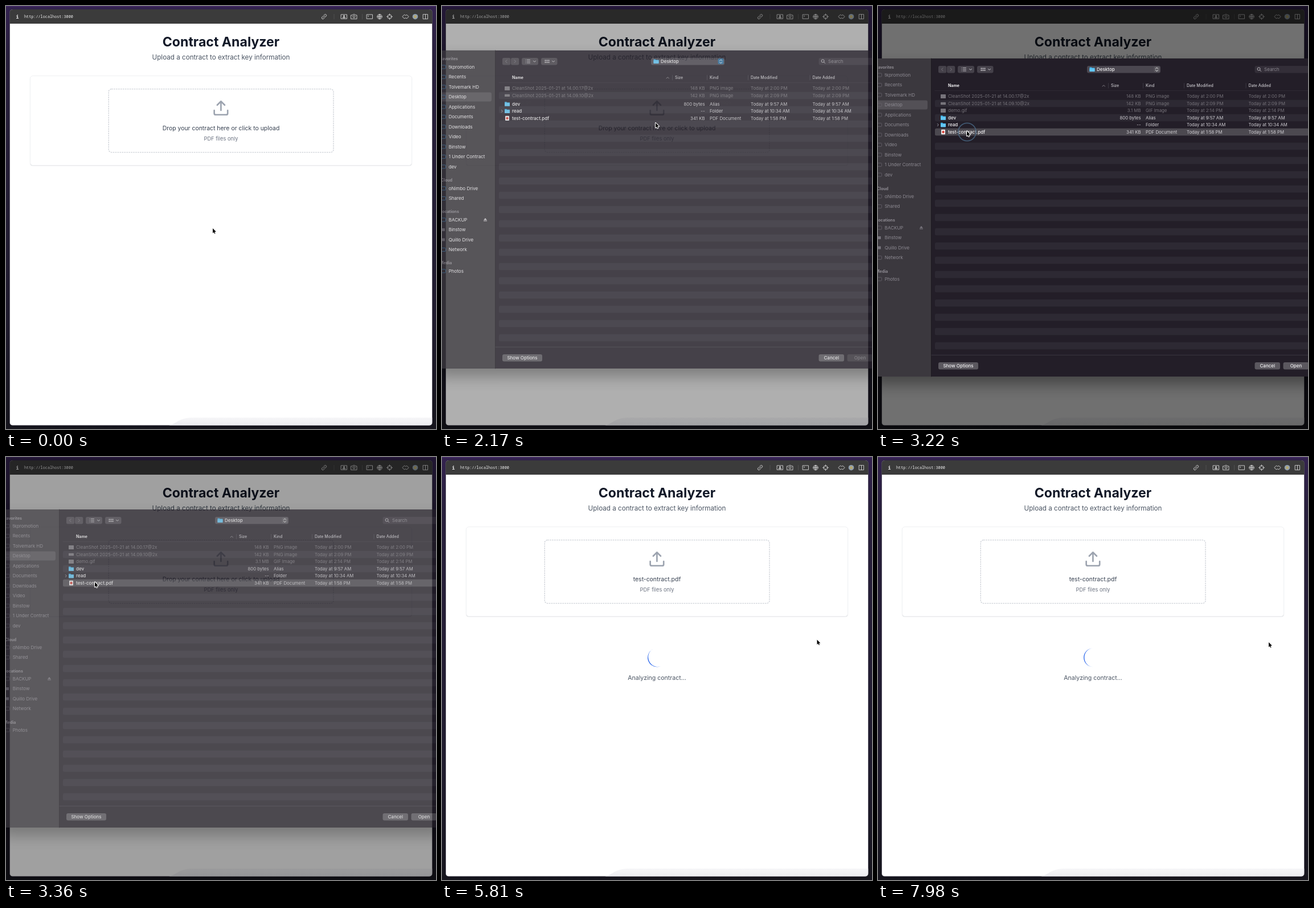
These frames come from a looping animation (755 by 742 pixels, 8000 ms). An HTML page:

```html
<!DOCTYPE html>
<html lang="en">
<head>
<meta charset="utf-8">
<title>Contract Analyzer</title>
<style>
html, body { margin: 0; width: 100%; height: 100%; overflow: hidden; background: #211a31; }
svg { display: block; position: fixed; inset: 0; width: 100%; height: 100%; }
text { font-family: Inter, "Open Sans", sans-serif; white-space: pre; }
.mono { font-family: "Noto Sans Mono", "DejaVu Sans Mono", monospace; }
.line { fill: none; stroke-linecap: round; stroke-linejoin: round; }
#dialog { filter: drop-shadow(0 14px 13px rgba(0, 0, 0, .38)); }
</style>
</head>
<body>
<svg id="stage" viewBox="0 0 755 742" preserveAspectRatio="none"></svg>
<script>
const LOOP = 8000, STEP = 70;
const stage = document.getElementById('stage');

// Markup helpers; text is placed by its vertical centre.
const text = (x, y, size, fill, str, more = '') =>
  `<text x="${x}" y="${y + size * 0.36}" font-size="${size}" fill="${fill}" ${more}>${str}</text>`;
const rect = (x, y, w, h, r, fill, more = '') =>
  `<rect x="${x}" y="${y}" width="${w}" height="${h}" rx="${r}" fill="${fill}" ${more}/>`;
const line = (d, stroke, w = 1, more = '') =>
  `<path class="line" d="${d}" stroke="${stroke}" stroke-width="${w}" ${more}/>`;
const circle = (x, y, r, fill, more = '') =>
  `<circle cx="${x}" cy="${y}" r="${r}" fill="${fill}" ${more}/>`;
const at = (x, y, body) => `<g transform="translate(${x} ${y})">${body}</g>`;
const MID = 'text-anchor="middle"', END = 'text-anchor="end"';
const BOLD = 'font-weight="700"', MEDIUM = 'font-weight="500"';

function toolbar() {
  const c = '#d4d4d4', k = (d) => line(d, c, 0.9);
  const ring = (r) => circle(0, 0, r, 'none', `stroke="${c}" stroke-width=".9"`);
  const frame = 'M-5 -3.7H5V3.7H-5Z';
  const icons = [
    [558.5, `<g transform="rotate(-45)">${k('M-.8 -2H-3a2 2 0 0 0 0 4H-.8M.8 -2H3a2 2 0 0 1 0 4H.8M-2 0H2')}</g>`],
    [593.5, k(frame) + circle(0, -1, 1.4, c) + rect(-2.6, 0.8, 5.2, 1.8, 0.8, c)],
    [611, k('M-5 -2.7H-2.6L-1.6 -4H1.6L2.6 -2.7H5V4H-5Z') + ring(1.9)],
    [638.5, k(frame) + k('M-3 -1.8L-1.8 -.8L-3 .2')],
    [656, ring(4.2) + k('M-4.2 0H4.2M0 -4.2V4.2M0 -4.2Q-4 0 0 4.2Q4 0 0 -4.2')],
    [673.5, ring(3.6) + k('M-5 0H-2M5 0H2M0 -5V-2M0 5V2')],
    [701.5, k('M-1.5 -3.2L0 -2L1.5 -3.2L3.2 -2.6L5.5 0L3.2 2.6L1.5 3.2L0 2L-1.5 3.2L-3.2 2.6L-5.5 0L-3.2 -2.6Z')],
    [718.5, circle(0, 0, 4.8, '#8f9fb0') + circle(0, 0, 2.6, '#b5a873')],
    [736.5, k('M-4 -4H4V4H-4ZM0 -4V4')]
  ];
  return `<path d="M6.5 31V12Q6.5 6 12 6H743Q748.5 6 748.5 12V31Z" fill="#3b3b3b"/>` +
    text(20, 19, 8.5, '#f2f2f2', 'i', `class="mono" ${BOLD} ${MID}`) +
    text(32, 19, 6.82, '#ececec', 'http://localhost:3000', 'class="mono"') +
    line('M576 14.5V23M625.5 14.5V23', '#575757', 0.8) +
    icons.map(([x, body]) => at(x, 18.7, body)).join('');
}

function page() {
  return rect(0, 0, 755, 742, 0, 'url(#desk)') +
    rect(0, 0, 755, 1.2, 0, '#45296b') +
    rect(6.5, 6, 742, 729.8, 5, '#fff', 'stroke="#2d2938" stroke-width=".6"') +
    `<path d="M286 735.6C300 733 303 722 328 722H748.2V730Q748.2 735.6 742 735.6Z" fill="url(#foot)"/>` +
    toolbar() +
    text(377.5, 62.5, 23.1, '#111827', 'Contract Analyzer', `${BOLD} ${MID}`) +
    text(377.5, 90.3, 11.65, '#4b5563', 'Upload a contract to extract key information', MID) +
    rect(42, 123.2, 671, 157.4, 5, '#e3e4e7') +
    rect(42.3, 122.5, 670.4, 157, 5, '#fff', 'stroke="#ebecef" stroke-width=".8"') +
    rect(180.2, 145.7, 394.8, 111, 5, 'none', 'id="drop" stroke-width="1.31" stroke-dasharray="2.6 1.35"') +
    `<g transform="translate(361.7 163.3) scale(1.31)">` +
    line('M21 15v4a2 2 0 0 1-2 2H5a2 2 0 0 1-2-2v-4M17 8l-5-5-5 5M12 3v12', '#9ca3af', 2) + '</g>' +
    text(377.5, 214.6, 10.45, '#374151', '', `id="label" ${MID}`) +
    text(377.5, 233, 9.25, '#6b7280', 'PDF files only', MID) +
    `<g id="busy"><path id="spinner" d="M-16.4 0A16.4 16.4 0 0 0 16.4 0A16.4 15.1 0 0 1 -16.4 0Z" fill="#2563eb"/>` +
    text(377.5, 387.3, 10.55, '#4b5563', 'Analyzing contract...', MID) + '</g>';
}

function sidebar() {
  const groups = [
    [107, -3.7, 'Favorites', ['tkpromotion', 'Recents', 'Tolvemark HD', 'Desktop', 'Applications',
      'Documents', 'Downloads', 'Video', 'Binstow', '1 Under Contract', 'dev']],
    [320, -1.9, 'Cloud', ['oNimbo Drive', 'Shared']],
    [375, -3.7, 'Locations', ['BACKUP', 'Binstow', 'Quillo Drive', 'Network']],
    [465, -3.7, 'Media', ['Photos']]
  ];
  let out = rect(-10, 92, 103.5, 558, 0, '#3b383e') + rect(-6, 165.5, 93, 16, 3, '#535056');
  for (const [top, x, title, items] of groups) {
    out += text(x, top, 7, '#8f8c93', title, BOLD);
    items.forEach((name, i) => {
      const y = top + 14 + i * 17.5;
      const plain = title === 'Locations' && (i === 1 || i === 2);
      out += plain ? rect(0, y - 2.5, 5, 5, 0, '#77747c')
        : rect(-1.5, y - 3, 8, 6, 1.2, 'none', 'stroke="currentColor" stroke-width=".8"');
      out += text(11.7, y, 8, 'var(--ink)', name);
    });
  }
  return `<g id="side">${out}<path d="M73 389.5L76 386L79 389.5ZM73 390.5H79V391.6H73Z" fill="var(--ink)" opacity=".8"/></g>`;
}

const folder = (x, y) => `<path d="M${x - 4.5} ${y - 3.7}h3.4l1 1.1h4.6v6.3h-9z" fill="#43b4ec"/>` +
  rect(x - 4.5, y - 1.6, 9, 5.3, 0.7, '#63c7f6');

const ROW = 12.5, TOP = 158.5;
const rows = [
  ['CleanShot 2025-01-21 at 14.00.17@2x', '148 KB', 'PNG image', '2:00 PM'],
  ['CleanShot 2025-01-21 at 14.09.10@2x', '142 KB', 'PNG image', '2:09 PM'],
  ['demo.gif', '3.1 MB', 'GIF Image', '2:14 PM'],
  ['dev', '800 bytes', 'Alias', '9:57 AM'],
  ['read', '--', 'Folder', '10:34 AM'],
  ['test-contract.pdf', '341 KB', 'PDF Document', '1:58 PM']
];

function fileRow([name, size, kind, time], i) {
  const off = i < 3, ink = off ? '#757279' : '#f4f3f5', sub = off ? '#757279' : '#cfcdd2';
  let icon = folder(114.5, 0);
  if (off) icon = rect(110, i === 1 ? -2.2 : -3.5, 9, i === 1 ? 4.4 : 7, 0.5, '#77747b');
  if (i === 5) icon = rect(111, -4.2, 7, 8.4, 0.8, '#f2eeee') + circle(114.5, 0, 2.2, '#d8433b');
  if (i === 4) icon += line('M104.3 -2L106.3 0L104.3 2', '#aaa7ae', 0.9);
  const day = 'Today at ' + time;
  return `<g class="row">${icon}` + text(123, 0, 8, ink, name, off ? '' : MEDIUM) +
    text(461.5, 0, 7.8, sub, size, END) + text(470, 0, 7.8, sub, kind) +
    text(542, 0, 7.75, sub, day) + text(650.5, 0, 7.75, sub, day) + '</g>';
}

function dialog() {
  let stripes = '';
  for (let k = 1; k < 36; k += 2) stripes += rect(100, TOP + (k - 0.5) * ROW, 670, ROW, 2.5, '#2d2933');
  const btn = '#5b585f', box = '#45414a', pale = '#c9c7cc';
  const button = (x, w, label) => rect(x, 625, w, 12.5, 3, btn) +
    text(x + w / 2, 631.2, 8, '#f3f2f4', label, `${MEDIUM} ${MID}`);
  const down = (x) => line(`M${x - 2} 110.3L${x} 112.3L${x + 2} 110.3`, pale);
  let cells = '';
  for (let i = 0; i < 6; i++) cells += rect(180.5 + i % 3 * 3, i < 3 ? 108.6 : 111.8, 2, 2, 0.3, pale);
  return rect(-10, 92, 780, 558, 0, '#231e28') + sidebar() +
    line('M93.5 92V650', '#17131b', 0.7) +
    rect(106, 105, 14.2, 12.5, 2.5, box) + rect(121, 105, 14.2, 12.5, 2.5, box) +
    line('M114 108.7L111.5 111.2L114 113.7M127 108.7L129.5 111.2L127 113.7', '#7d7a82', 0.9) +
    rect(140, 105, 29, 12.5, 3, box) + rect(174, 105, 28.5, 12.5, 3, box) +
    line('M147 108.5H147.2M147 111.2H147.2M147 113.9H147.2M149.3 108.5H154.5M149.3 111.2H154.5M149.3 113.9H154.5', pale, 0.9) +
    cells + down(162.5) + down(195.5) +
    rect(367, 105, 129, 12.5, 3, '#4b4750') + folder(376, 111.2) +
    text(384, 111.2, 8, '#f3f2f4', 'Desktop', MEDIUM) +
    rect(484.5, 106.2, 10, 10, 2.5, '#5b585f', 'id="stepper"') +
    line('M487.5 110L489.5 108L491.5 110M487.5 112.5L489.5 114.5L491.5 112.5', '#fff', 0.9) +
    rect(661.5, 105, 110, 12.5, 3, '#332e38') +
    circle(668.6, 110.5, 2.5, 'none', `stroke="${pale}" stroke-width=".9"`) +
    line('M670.5 112.4L672.6 114.5', pale, 0.9) + text(678, 111.2, 8, '#8b8890', 'Search') +
    text(123, 139.7, 7, '#f0eff1', 'Name', BOLD) + line('M394 141L396.3 139L398.6 141', '#9a979e', 0.8) +
    [[409, 'Size'], [470, 'Kind'], [542, 'Date Modified'], [650.5, 'Date Added']]
      .map(([x, s]) => text(x, 139.7, 7, pale, s, MEDIUM) + line(`M${x - 4.5} 135.5V144`, '#47434c', 0.7)).join('') +
    line('M100 148.5H755', '#36323b', 0.6) + stripes +
    rect(100, TOP + 4.5 * ROW, 670, ROW, 2.5, '#4c4950', 'id="picked"') +
    rows.map(fileRow).join('') +
    line('M94 612.3H755', '#423e47', 0.8) +
    button(106, 70, 'Show Options') + button(661.5, 44.5, 'Cancel') +
    `<g id="open">${button(711.5, 45, 'Open')}</g>`;
}

stage.innerHTML = `<defs>
  <linearGradient id="desk" x2="0" y2="1"><stop stop-color="#33224f"/><stop offset=".12" stop-color="#281f3c"/>
    <stop offset=".75" stop-color="#1f1b2d"/><stop offset="1" stop-color="#15141c"/></linearGradient>
  <linearGradient id="foot" x2="0" y2="1"><stop stop-color="#f6f6f8"/><stop offset="1" stop-color="#ececf0"/></linearGradient>
  </defs>${page()}${rect(0, 0, 755, 742, 0, '#000', 'id="shade"')}<g id="dialog">${dialog()}</g>
  <g id="ring">${circle(0, 0, 1, 'none', 'stroke="#4a6a86" stroke-width="1.7" vector-effect="non-scaling-stroke"')}</g>
  <path id="cursor" d="M0 0V8.4L1.9 6.7L3.2 9.5L4.5 8.9L3.2 6.2L5.9 6Z" fill="#000" stroke="#fff"
    stroke-width="2" stroke-linejoin="round" paint-order="stroke"/>`;

const el = {};
stage.querySelectorAll('[id]').forEach((n) => { el[n.id] = n; });
const rowEls = [...stage.querySelectorAll('.row')];
const set = (n, attrs) => { for (const k in attrs) n.setAttribute(k, attrs[k]); };
const clamp = (v) => Math.min(1, Math.max(0, v));
const span = (t, a, b) => clamp((t - a) / (b - a));
const ease = (p) => p * p * (3 - 2 * p);

// Pointer stops: time, x, y
const stops = [[350, 363, 390], [910, 371, 262], [1050, 371, 262], [1400, 375, 205], [2310, 375, 205],
  [2870, 156, 219.5], [3430, 156, 219.5], [4060, 398.5, 299], [4620, 627, 319], [5810, 658.5, 320.5], [6300, 686, 325]];

function pointer(t) {
  let i = 0;
  while (i < stops.length - 2 && t > stops[i + 1][0]) i++;
  const [t0, x0, y0] = stops[i], [t1, x1, y1] = stops[i + 1], p = ease(span(t, t0, t1));
  return [x0 + (x1 - x0) * p, y0 + (y1 - y0) * p];
}

function draw(t) {
  const [x, y] = pointer(t), chosen = t >= 3430, closing = span(t, 3290, 3500);
  const opening = span(t, 2030, 2280), active = t < 3150;
  const hover = t < 2100 && x > 180 && x < 575 && y > 145 && y < 257;

  set(el.drop, { stroke: hover ? '#3b82f6' : '#cdd1d7' });
  el.label.textContent = chosen ? 'test-contract.pdf' : 'Drop your contract here or click to upload';
  set(el.busy, { visibility: chosen ? 'visible' : 'hidden' });
  // One turn takes 15 steps; it points up (plus a little) at 4060 ms.
  const turn = 185 + (t - 4060) / STEP * 24;
  set(el.spinner, { transform: `translate(377.5 351.8) rotate(${turn % 360})` });

  set(el.shade, { opacity: 0.56 * opening * (1 - closing) });
  const alpha = (1 - (1 - opening) ** 1.7) * (1 - closing);
  set(el.dialog, {
    opacity: alpha, display: alpha > 0 ? 'inline' : 'none',
    transform: `translate(0 ${-32 * (1 - opening)})`
  });
  el.side.style.color = active ? '#4f88b4' : '#66636b';
  el.side.style.setProperty('--ink', active ? '#f6f5f7' : '#8d8a92');
  set(el.stepper, { fill: active ? '#2c6f9f' : '#5b585f' });
  set(el.picked, { visibility: t >= 2940 ? 'visible' : 'hidden' });
  set(el.open, { opacity: t >= 2940 ? 1 : 0.4 });
  const grow = span(t, 2120, 2370);
  rowEls.forEach((row, i) => {
    const shift = i > 2 ? (grow - 1) * ROW : 0;
    set(row, { transform: `translate(0 ${TOP + i * ROW + shift})`, opacity: i === 2 ? grow * grow : 1 });
  });

  const p = Math.max(...[1470, 3010].map((s) => t >= s && t < s + 350 ? (t - s) / 350 : 0));
  set(el.ring, {
    visibility: p > 0 ? 'visible' : 'hidden', opacity: 1 - p * 0.35,
    transform: `translate(${x + 0.5} ${y + 1.5}) scale(${9 + 11 * p})`
  });
  set(el.cursor, { transform: `translate(${x} ${y})` });
}

const start = performance.now();
function tick() {
  const t = (performance.now() - start) % LOOP;
  draw(Math.floor(t / STEP) * STEP);
  requestAnimationFrame(tick);
}
draw(0);
requestAnimationFrame(tick);
</script>
</body>
</html>
```
